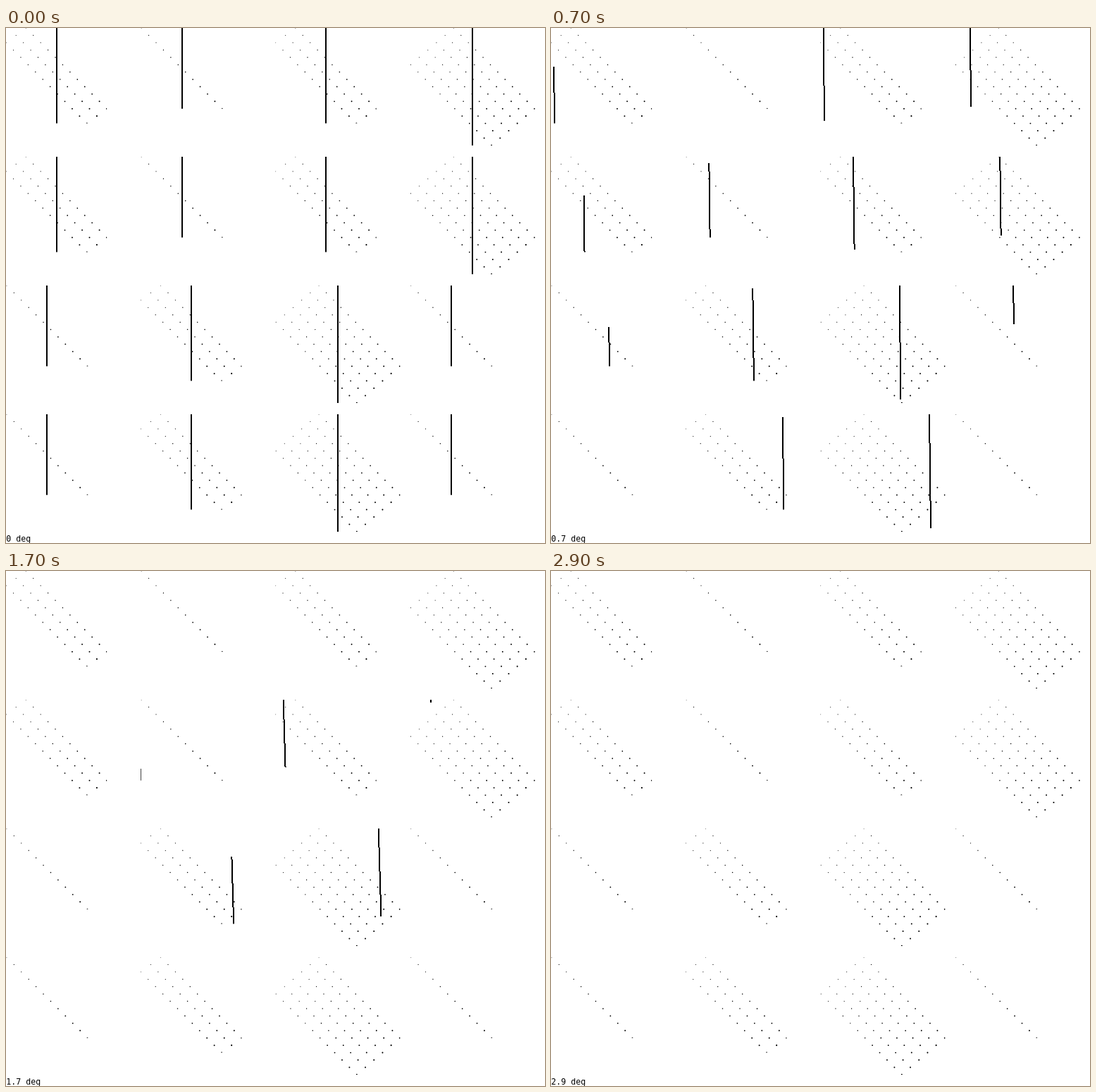
An HTML page with a canvas for the animation above (3 s loop, 765 px wide and 732 px high).

```html
<!DOCTYPE html>
<html lang="en">
<head>
<meta charset="utf-8">
<title>Slit rotation over dot lattices</title>
<style>
  html, body { margin: 0; width: 100%; height: 100%; overflow: hidden; background: #fff; }
  canvas { display: block; }
</style>
</head>
<body>
<canvas id="stage" width="765" height="732"></canvas>
<script>
const ctx = document.getElementById('stage').getContext('2d');
const LOOP = 3000, STEP = 100;
const CELL_W = 191.25, CELL_H = 183;
const COUNT = 12, PITCH = 10.43;

// Each lattice is a set of parallel diagonals, shifted sideways by `shift`;
// `half` is half the length of the slit.
const KINDS = {
  A: { rows: 1, shift: 0, inset: 0.9, half: 74 },
  B: { rows: 3, shift: 14.1, inset: 0.1, half: 89 },
  C: { rows: 6, shift: 12.2, inset: 0.6, half: 104.5 }
};
for (const kind of Object.values(KINDS)) {
  kind.w = (COUNT - 1) * PITCH + (kind.rows - 1) * kind.shift + 2 * kind.inset;
  kind.h = (COUNT + kind.rows - 2) * PITCH;
}

const LAYOUT = ['BABC', 'BABC', 'ABCA', 'ABCA'];
// Distances of the cells from the common centre of rotation.
const FAR_X = [-6240, -2080, 2080, 6240];
const FAR_Y = [-5475, -1998, 1998, 5475];

function drawDots({ rows, shift, inset }, left, top) {
  ctx.beginPath();
  for (let row = 0; row < rows; row++) {
    for (let i = 0; i < COUNT; i++) {
      const x = left + inset + (rows - 1 - row) * shift + i * PITCH;
      const y = top + (row + i) * PITCH;
      const radius = 0.55 + 0.045 * i;
      ctx.moveTo(x + radius, y);
      ctx.arc(x, y, radius, 0, Math.PI * 2);
    }
  }
  ctx.fill();
}

// Drawn row by row on whole pixels, so that the slit stays hard-edged.
function drawSlit(half, midX, midY, angle) {
  const slope = Math.tan(angle), reach = half * Math.cos(angle);
  const end = Math.round(midY + reach);
  for (let y = Math.round(midY - reach); y < end; y++) {
    const x = midX + (y + 0.5 - midY) * slope;
    ctx.fillRect(Math.round(x) - 1, y, 2, 1);
  }
}

function drawCell(col, row, angle) {
  const kind = KINDS[LAYOUT[row][col]];
  const left = col * CELL_W, top = row * CELL_H;
  const sin = Math.sin(angle), drop = Math.cos(angle) - 1;
  const midX = left + kind.w / 2 + FAR_X[col] * drop + FAR_Y[row] * sin;
  const midY = top + kind.h / 2 + FAR_Y[row] * drop - FAR_X[col] * sin;
  ctx.save();
  ctx.beginPath();
  ctx.rect(left, top, kind.w, kind.h);
  ctx.clip();
  drawDots(kind, left, top);
  drawSlit(kind.half, midX, midY, angle);
  ctx.restore();
}

function draw(time) {
  const degrees = Math.floor((time % LOOP) / STEP) / 10;
  ctx.fillStyle = '#fff';
  ctx.fillRect(0, 0, 765, 732);
  ctx.fillStyle = '#000';
  for (let row = 0; row < 4; row++) {
    for (let col = 0; col < 4; col++) drawCell(col, row, degrees * Math.PI / 180);
  }
  ctx.font = '11.63px "DejaVu Sans Mono", monospace';
  ctx.fillText(`${degrees} deg`, 0.3, 730);
}

const start = performance.now();
function tick() {
  draw(performance.now() - start);
  requestAnimationFrame(tick);
}
draw(0);
requestAnimationFrame(tick);
</script>
</body>
</html>
```
